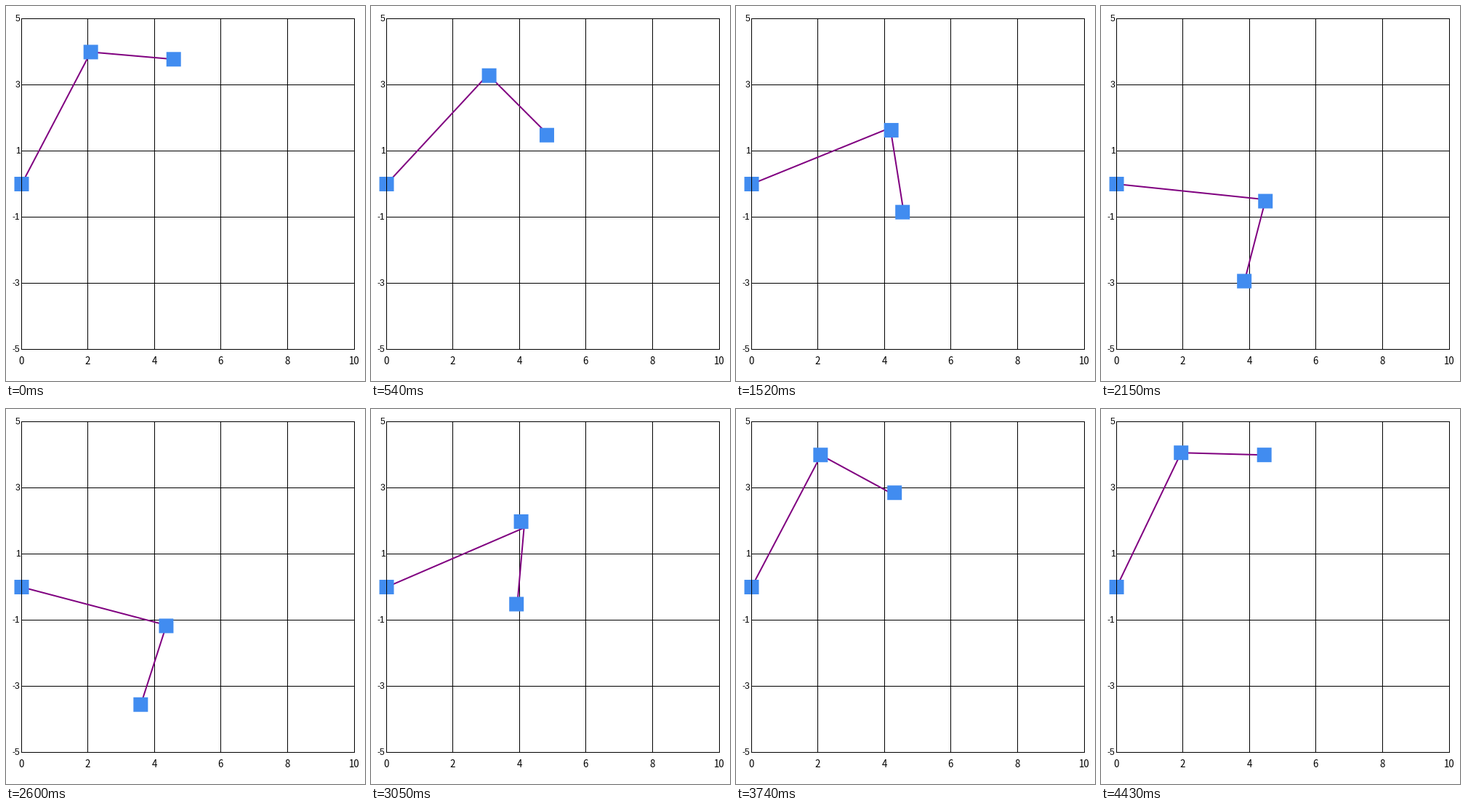
A matplotlib script for the animation above (4.52 s loop, 494x516 px).

```python
import numpy as np
import matplotlib.pyplot as plt
from matplotlib.animation import FuncAnimation
from matplotlib.patches import Rectangle

W, H, DPI = 494, 516, 100
PX = 72 / DPI
LOOP, TICK = 4520, 10
LEFT, RIGHT, TOP, BOTTOM = 21, 479, 17, 472
UPPER, FORE = 4.5, 2.5      # link lengths in chart units
SIZE = 20                   # joint marker
LAG = 25                    # links trail the markers by this many ms

# Key poses: time (ms), angle of the upper link, angle of the forearm
T, *ANGLES = np.array([
    (0, 62.5, -5), (540, 46.8, -46.1), (1080, 37.1, -57.2),
    (1520, 21.2, -82.2), (2150, -6.6, -104.7), (2780, -16.2, -108.2),
    (3050, 26.1, -93.2), (3740, 62.6, -27.2), (4430, 64.5, -1.5),
]).T

# The picture refreshes every 90 ms, with three shorter holds
holds = np.full(51, 90)
holds[12] = 80
holds[[34, 47]] = 60
STARTS = np.cumsum(holds) - holds


def ease_through(t, v):
    """Monotone cubic through the key values, coming to rest at the last."""
    d = np.diff(v) / np.diff(t)
    a, b = d[:-1], d[1:]
    mid = np.where(a * b > 0, 2 * a * b / (a + b), 0)
    m = np.concatenate(([d[0]], mid, [0]))

    def value(at):
        at = np.clip(at, t[0], t[-1])
        i = min(np.searchsorted(t, at, side="right") - 1, len(t) - 2)
        h = t[i + 1] - t[i]
        s = (at - t[i]) / h
        return ((1 - s) ** 2 * ((1 + 2 * s) * v[i] + s * h * m[i])
                + s * s * ((3 - 2 * s) * v[i + 1] + (s - 1) * h * m[i + 1]))
    return value


upper_angle, fore_angle = (ease_through(T, v) for v in ANGLES)


def to_px(x, y):
    """Chart units to pixel centres."""
    return (LEFT + 0.5 + x * (RIGHT - LEFT) / 10,
            (TOP + BOTTOM + 1) / 2 - y * (BOTTOM - TOP) / 10)


def arm(t):
    """Pixel positions of shoulder, elbow and hand."""
    a, b = np.radians(upper_angle(t)), np.radians(fore_angle(t))
    ex, ey = UPPER * np.cos(a), UPPER * np.sin(a)
    hx, hy = ex + FORE * np.cos(b), ey + FORE * np.sin(b)
    return [to_px(0, 0), to_px(ex, ey), to_px(hx, hy)]


fig = plt.figure(figsize=(W / DPI, H / DPI), dpi=DPI, facecolor="white")
ax = fig.add_axes([0, 0, 1, 1])
ax.set_xlim(0, W)
ax.set_ylim(H, 0)
ax.axis("off")


def rule(xs, ys, z=1):
    # Whole coordinates snap to the centre of their pixel
    ax.plot(xs, ys, color="black", lw=PX, snap=True,
            solid_capstyle="projecting", zorder=z)


for k in range(6):
    x = LEFT + k * (RIGHT - LEFT) // 5
    y = TOP + k * (BOTTOM - TOP) // 5
    rule([x, x], [TOP, BOTTOM], 4 if k == 0 else 1)
    rule([LEFT, RIGHT], [y, y])
    ax.text(x, 493, str(2 * k), ha="center", va="baseline",
            family="Noto Sans CJK JP", size=13.3 * PX)
    ax.text(19.5, y + 4, str(5 - 2 * k), ha="right", va="baseline",
            family="Liberation Sans", size=12 * PX)

links, = ax.plot([], [], color="purple", lw=2 * PX, zorder=2)
joints = [ax.add_patch(Rectangle((0, 0), SIZE, SIZE, fc="#418cf0", ec="none",
                                 lw=0, snap=False, zorder=3))
          for _ in range(3)]


def draw(n):
    t = STARTS[np.searchsorted(STARTS, n * TICK, side="right") - 1]
    links.set_data(*zip(*arm(t - LAG)))
    for joint, (x, y) in zip(joints, arm(t)):
        joint.set_xy((x - SIZE / 2, y - SIZE / 2))
    return [links, *joints]


anim = FuncAnimation(fig, draw, frames=LOOP // TICK, interval=TICK,
                     repeat=True, repeat_delay=0)
plt.show()
```
